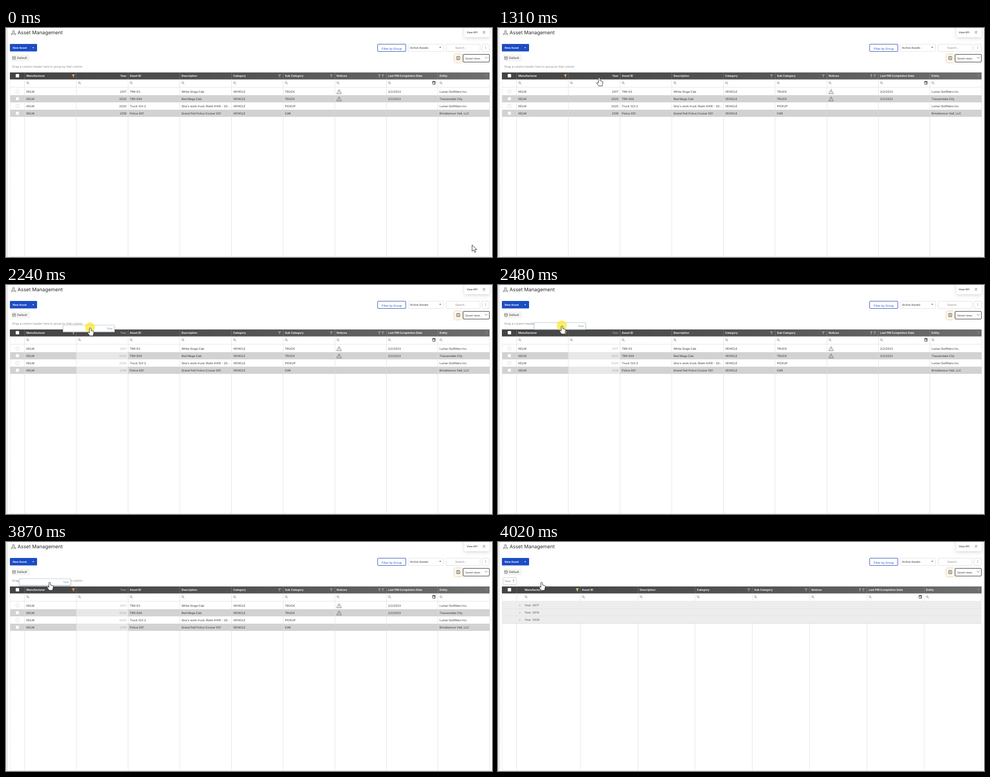
Recreate the animation shown at these times as an HTML page with a canvas. Size 1001x474 px, loop 5.98 s.

```html
<!DOCTYPE html>
<html lang="en">
<head>
<meta charset="utf-8">
<title>Asset Management</title>
<style>
html, body { margin: 0; width: 100%; height: 100%; overflow: hidden; background: #fff; }
canvas { display: block; width: 1001px; height: 474px; }
</style>
</head>
<body>
<canvas id="stage"></canvas>
<script>
const W = 1001, H = 474, LOOP = 5980;
const canvas = document.getElementById('stage');
const dpr = window.devicePixelRatio || 1;
canvas.width = W * dpr;
canvas.height = H * dpr;
const c = canvas.getContext('2d');
c.scale(dpr, dpr);
c.textRendering = 'geometricPrecision';

const LINE = '#dcdcdc', INK = '#333';
const ARROW = new Path2D('M0 0V13.2L3 10.4L5.4 15.6L7.7 14.6L5.4 9.6H9.6Z');
const HAND = new Path2D('M-1.7 1.5Q0 -1 1.7 1.5V6L5.5 7Q7.8 7.5 7.5 10L6.5 14L6 17H-1L-5 11.5Q-5.6 9.3 -3.4 9.8L-1.7 11Z');
const FUNNEL = new Path2D('M-3.2 -3H3.2L.9 .2V3.4L-.9 2.6V.2Z');

const NAMES = ['Manufacturer', 'Year', 'Asset ID', 'Description', 'Category',
  'Sub Category', 'Notices', 'Last PM Completion Date', 'Entity'];
const FLAT = [38, 144.5, 251, 357.5, 464, 570.5, 677, 783, 889, 996];
const GROUPED = [38, 169, 288, 405.5, 523.5, 641.5, 759.5, 877.5, 996];
const ROWS = [
  ['KELM', '2017', 'TRK-03', 'White Singe Cab', 'VEHICLE', 'TRUCK', '!', '2/2/2023', 'Lumar Outfitters Inc.'],
  ['KELM', '2020', 'TRK-004', 'Red Mega Cab', 'VEHICLE', 'TRUCK', '!', '2/2/2023', 'Tressendale City'],
  ['KELM', '2020', 'Truck 123-2', "Ona's work truck (Kelm K410 - 20...", 'VEHICLE', 'PICKUP', '', '', 'Lumar Outfitters Inc.'],
  ['KELM', '2019', 'Police 001', 'Grand Pell Police Cruiser 001', 'VEHICLE', 'CAR', '', '', 'Brindlemoor Hall, LLC']
];

const clamp = v => Math.max(0, Math.min(1, v));
const lerp = (a, b, p) => a + (b - a) * p;
const easeOut = (p, k) => 1 - (1 - p) ** k;

// Progress of a move that advances in n even steps, the first one at `from`.
const steps = (t, from, to, n) =>
  clamp((Math.floor((t - from) / (to - from) * (n - 1) + 0.09) + 1) / n);

function text(s, x, y, size = 5.95, color = INK, weight = 400, align = 'left') {
  c.font = `${weight} ${size}px Inter, "Open Sans", sans-serif`;
  c.fillStyle = color;
  c.textAlign = align;
  c.textBaseline = 'middle';
  c.fillText(s, x, y + 0.3);
}

function rect(x, y, w, h, fill) {
  c.fillStyle = fill;
  c.fillRect(x, y, w, h);
}

function box(x, y, w, h, fill, stroke, r = 1, lw = 1) {
  c.beginPath();
  c.roundRect(x, y, w, h, r);
  if (fill) { c.fillStyle = fill; c.fill(); }
  if (stroke) { c.strokeStyle = stroke; c.lineWidth = lw; c.stroke(); }
}

function poly(points, color, lw = 0.8, close = false) {
  c.beginPath();
  for (let i = 0; i < points.length; i += 2) c.lineTo(points[i], points[i + 1]);
  if (close) c.closePath();
  c.strokeStyle = color;
  c.lineWidth = lw;
  c.stroke();
}

function disc(x, y, r, fill, stroke, lw = 0.8) {
  c.beginPath();
  c.arc(x, y, r, 0, Math.PI * 2);
  if (fill) { c.fillStyle = fill; c.fill(); }
  if (stroke) { c.strokeStyle = stroke; c.lineWidth = lw; c.stroke(); }
}

function shape(path, x, y, fill, stroke) {
  c.save();
  c.translate(x, y);
  c.fillStyle = fill;
  c.fill(path);
  if (stroke) {
    c.strokeStyle = stroke;
    c.lineWidth = 1;
    c.lineJoin = 'round';
    c.stroke(path);
  }
  c.restore();
}

function caret(x, y, color) {
  c.beginPath();
  c.moveTo(x - 1.8, y - 0.9);
  c.lineTo(x + 1.8, y - 0.9);
  c.lineTo(x, y + 1.1);
  c.fillStyle = color;
  c.fill();
}

function withShadow(color, blur, dy, draw) {
  c.save();
  c.shadowColor = color;
  c.shadowBlur = blur * dpr;
  c.shadowOffsetY = dy * dpr;
  draw();
  c.restore();
}

function upArrow(x, y, color) {
  poly([x, y + 3, x, y - 3], color);
  poly([x - 1.6, y - 1.4, x, y - 3, x + 1.6, y - 1.4], color);
}

function magnifier(x, y) {
  disc(x - 0.6, y - 0.6, 1.8, null, '#666', 0.7);
  poly([x + 0.7, y + 0.7, x + 2.6, y + 2.6], '#666', 0.9);
}

function warning(x, y) {
  poly([x, y - 4.5, x + 5, y + 4, x - 5, y + 4], '#4d5a73', 0.8, true);
  poly([x, y - 1.5, x, y + 1.3], '#4d5a73', 0.8);
  rect(x - 0.4, y + 2, 0.8, 0.8, '#4d5a73');
}

function toolbar() {
  const edge = c.createLinearGradient(0, 0, 5, 0);
  edge.addColorStop(0, '#f4f4f4');
  edge.addColorStop(0.45, '#e4e4e4');
  edge.addColorStop(1, '#fff');
  rect(0, 0, 5, H, edge);

  disc(15.4, 6.8, 1.8, null, '#444');
  poly([14.4, 8.4, 10.5, 15], '#444');
  poly([16.4, 8.4, 20.3, 15], '#444');
  poly([11, 11.4, 13.3, 12.6, 17.5, 12.6, 19.8, 11.4], '#444');
  text('Asset Management', 23.8, 10, 10.2, '#2c2c2c');

  withShadow('rgba(0,0,0,.16)', 7, 2, () => box(944, -6, 52, 25, '#fff', null, 3));
  text('View KPI', 949, 8.7, 5.2, INK, 500);
  poly([982, 7, 987, 7], '#777', 0.7);
  poly([982, 10.8, 987, 10.8], '#777', 0.7);
  poly([982.5, 9.7, 984.3, 8.2, 985.3, 9.2, 987, 7.7], '#555', 0.7);

  box(8, 33, 56, 15.5, '#1d4dc4', null, 1.5);
  text('New Asset', 13.7, 40.8, 5.6, '#fff', 600);
  caret(56, 41, '#fff');

  box(765.5, 33.5, 58, 15, '#fff', '#2f50ad', 1.5);
  text('Filter by Group', 794.6, 43, 5.95, '#2a55c8', 400, 'center');
  box(828.5, 33.5, 73, 15, '#fff', '#e4e4e4');
  text('Active Assets', 832.3, 40.8, 5.85);
  caret(894.3, 40.2, '#333');
  box(906.5, 33.5, 70, 15, '#fff', '#e0e0e0');
  text('Search...', 925.3, 41, 5.75, '#888');
  box(980.5, 33.5, 15, 15, '#fff', '#dcdcdc');
  for (let i = -1; i < 2; i++) disc(988, 40.5 + i * 2.2, 0.55, '#444');

  box(11, 55, 38.5, 14, '#f5f5f4', null, 2);
  box(13.5, 59.3, 6, 5.6, null, '#58645c', 0.6, 0.8);
  poly([13.5, 61.2, 19.5, 61.2], '#58645c', 0.7);
  poly([16.5, 61.2, 16.5, 64.8], '#58645c', 0.7);
  text('Default', 22.8, 62, 6.05);

  withShadow('rgba(226,160,70,.8)', 4, 0, () => box(924, 54.5, 15, 16.5, '#fbf7f0', null, 1.5));
  box(928, 58.8, 6.8, 7, null, '#555', 0.8, 0.8);
  poly([929.7, 58.8, 929.7, 61, 932.8, 61, 932.8, 58.8], '#555', 0.7);
  poly([929.5, 65.8, 929.5, 63.2, 933.3, 63.2, 933.3, 65.8], '#555', 0.7);
  box(941.5, 54.5, 54, 16, '#fff', '#333', 1.5);
  text('Saved views', 946, 62.8, 5.2);
  poly([986.3, 60.2, 989, 62.9, 991.7, 60.2], '#555', 0.8);
}

function header(names, edges, grouped) {
  const shade = c.createLinearGradient(8, 0, 996, 0);
  shade.addColorStop(0, '#444');
  shade.addColorStop(0.5, '#535353');
  shade.addColorStop(1, '#6e6e6e');
  rect(8, 92, 988, 14.5, shade);
  box(20, 95.3, 7, 7, '#fff', null, 0.8);

  names.forEach((name, i) => {
    const left = edges[i], right = edges[i + 1];
    const indent = grouped && !i ? 13 : 0;
    rect(left, 92, 0.8, 14.5, 'rgba(255,255,255,.2)');
    if (name !== 'Year') text(name, left + 4 + indent, 99, 5.8, '#fff', 600);
    magnifier(left + 7 + indent, 113.8);
    if (/Category|Notices/.test(name)) shape(FUNNEL, right - 7, 99, '#929292');
    if (name === 'Entity') shape(FUNNEL, right - 6.5, 99, '#7d7d74');
    if (name === 'Notices') upArrow(right - 14, 99, '#e4e4e4');
    if (name === 'Manufacturer')
      shape(FUNNEL, right - 5.7, 99, grouped ? '#ecd59a' : '#eda84a');
    if (name.startsWith('Last')) {
      box(right - 10.3, 110.9, 5.4, 5.7, null, '#333', 0.5, 0.9);
      rect(right - 10.5, 110.5, 5.8, 1.8, '#333');
      rect(right - 7.2, 113.8, 1.5, 1.5, '#333');
    }
  });
  rect(8, 122.3, 988, 0.8, LINE);
}

function columnLines(edges, top) {
  edges.forEach(x => {
    rect(x, 106.5, 0.8, 16, LINE);
    rect(x, top, 0.8, H - top, LINE);
  });
  rect(8, 106.5, 0.7, H, '#e6e6e6');
  rect(8, 473, 988, 1, '#e2e2e2');
}

function flatTable(dragging) {
  header(NAMES, FLAT, false);
  text('Year', 248, 99, 5.8, dragging ? '#a5a5a5' : '#fff', 600, 'right');
  ROWS.forEach((row, r) => {
    const y = 131.6 + r * 15;
    if (r % 2) {
      rect(8, y - 7.5, 988, 14.8, '#d1d2d1');
      if (dragging) rect(145, y - 7.5, 106, 14.8, '#e8e8e8');
    }
    box(20.5, y - 3.3, 6, 6.3, '#fff', r % 2 ? '#e6e6e6' : '#d8d8d8', 0.8, 0.8);
    row.forEach((value, i) => {
      if (i === 1) text(value, 248, y, 5.95, dragging ? '#a8a8a8' : INK, 400, 'right');
      else if (value === '!') warning(686, y + 0.4);
      else text(value, FLAT[i] + 4, y);
    });
  });
  columnLines(FLAT, 123);
}

function groupedTable() {
  header(NAMES.filter(n => n !== 'Year'), GROUPED, true);
  ['2017', '2019', '2020'].forEach((year, i) => {
    const y = 123.2 + i * 15.1;
    rect(8, y, 988, 15.1, '#ededed');
    rect(8, y + 14.5, 988, 0.8, '#d3d3d3');
    poly([44.3, y + 6.8, 45.6, y + 8.1, 44.3, y + 9.4], '#666', 0.8);
    text('Year: ' + year, 54.8, y + 7.8, 5.85, '#777', 600);
  });
  columnLines(GROUPED, 168.6);
}

function chip() {
  box(10.5, 73.5, 27.5, 15, '#fff', '#cfcfcf');
  text('Year', 13.3, 81.3, 6.1, '#8a8a8a');
  upArrow(32, 80.6, '#888');
}

function ghost(x, y) {
  withShadow('rgba(0,0,0,.2)', 3, 1, () => rect(x, y, 106.5, 15, '#fff'));
  box(x + 0.5, y + 0.5, 105.5, 14, null, '#b9c8d3', 0, 0.9);
  rect(x, y + 14.2, 106.5, 0.8, '#8ba4b6');
  text('Year', x + 103, y + 7.7, 6, '#999', 400, 'right');
}

function pointer(t) {
  const enter = steps(t, 70, 220, 3);
  const sweep = easeOut(steps(t, 450, 1000, 8), 1.83);
  const rise = steps(t, 1230, 1540, 5);
  const drag = steps(t, 2090, 2630, 8);
  const settle = steps(t, 2710, 2860, 3);
  if (rise === 0) {
    const x = lerp(lerp(960, 720, enter), 207.5, sweep);
    const y = lerp(lerp(449, 328.5, enter), 107, sweep);
    shape(ARROW, x, y, '#fff', '#2b2b2b');
    return;
  }
  const x = lerp(208.5, 102.5, drag ** 1.13) - 12.5 * settle;
  const y = lerp(lerp(106, 98.6, rise), 84, easeOut(drag, 2.65)) - settle;
  if (drag > 0 && t < 3950)
    ghost(lerp(144.5, 40, drag ** 1.37) - 13 * settle,
      lerp(92, 76.5, easeOut(drag, 2)) - settle);
  if (t >= 1860 && t < 3870)
    disc(x - 0.6, y - 0.5, 10.3, `rgba(250,232,45,${drag > 0 ? 0.74 : 0.56})`);
  shape(HAND, x, y, '#fff', '#2b2b2b');
}

function draw(t) {
  rect(0, 0, W, H, '#fff');
  toolbar();
  if (t < 3950) text('Drag a column header here to group by that column', 13, 80.3, 5.93, '#888');
  else chip();
  if (t < 4020) flatTable(t >= 2090 && t < 3950);
  else groupedTable();
  pointer(t);
}

const start = performance.now();
function tick() {
  draw((performance.now() - start) % LOOP);
  requestAnimationFrame(tick);
}
draw(0);
requestAnimationFrame(tick);
</script>
</body>
</html>
```
